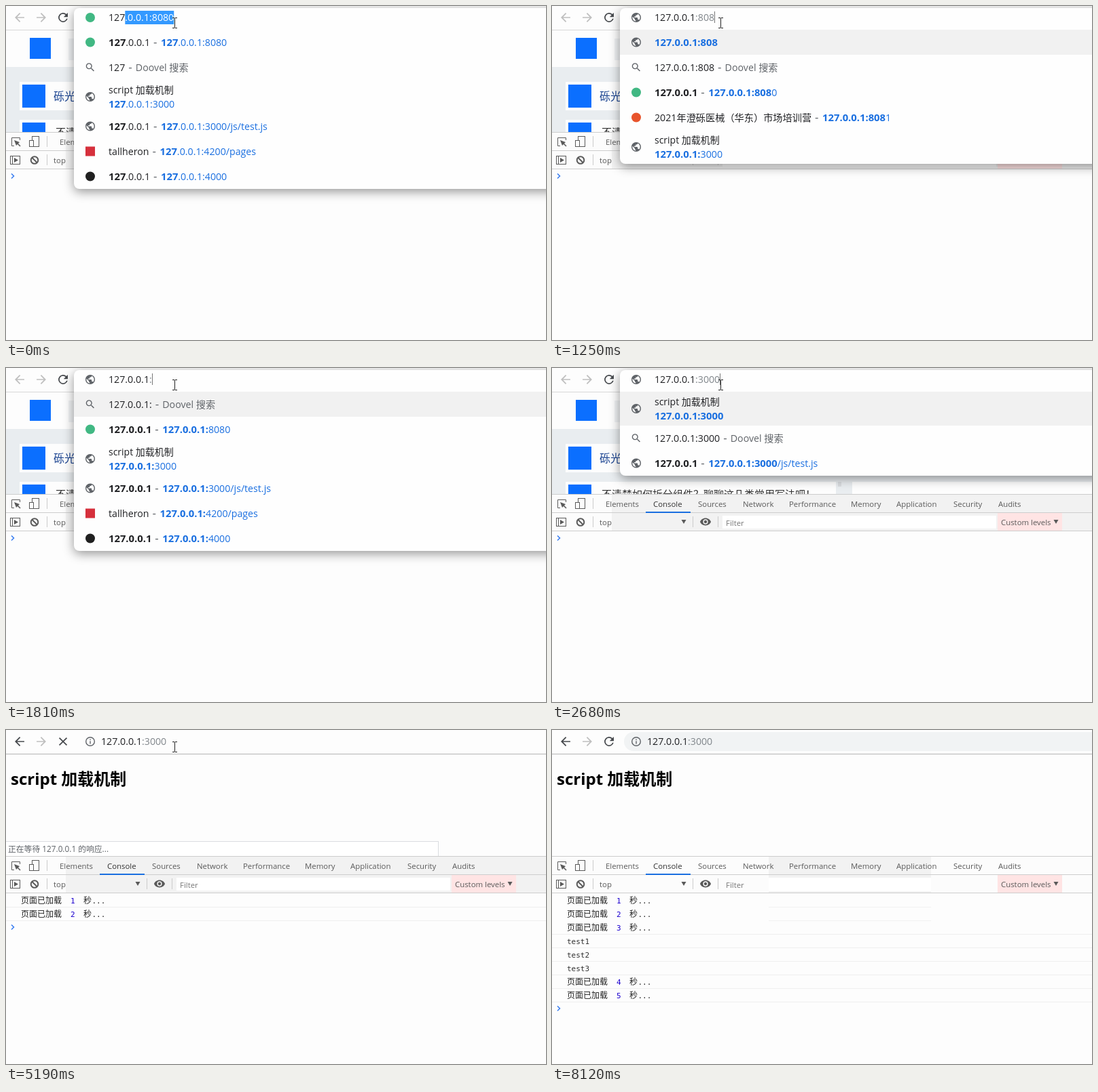
An HTML page with a canvas that plays this animation: 795x493 px, repeating every 8.22 s.

```html
<!DOCTYPE html>
<html lang="zh">
<head>
<meta charset="utf-8">
<style>
html, body { margin: 0; width: 100%; height: 100%; overflow: hidden; background: #fdfdfd; }
canvas { display: block; }
</style>
</head>
<body>
<canvas id="stage" width="795" height="493"></canvas>
<script>
const LOOP = 8220;
const c = document.getElementById('stage').getContext('2d');
const UI = '"Open Sans", "Noto Sans CJK SC", "Noto Sans CJK", sans-serif';
const MONO = '"DejaVu Sans Mono", "Noto Sans CJK SC", monospace';
const DARK = '#202124', GREY = '#5f6368', BLUE = '#1a6fe0';

const icons = {
  globe: 'M12 2C6.48 2 2 6.48 2 12s4.48 10 10 10 10-4.48 10-10S17.52 2 12 2zm-1 17.93c-3.95-.49-7-3.85-7-7.93 0-.62.08-1.21.21-1.79L9 15v1c0 1.1.9 2 2 2v1.93zm6.9-2.54c-.26-.81-1-1.39-1.9-1.39h-1v-3c0-.55-.45-1-1-1H8v-2h2c.55 0 1-.45 1-1V7h2c1.1 0 2-.9 2-2v-.41c2.93 1.19 5 4.06 5 7.41 0 2.08-.8 3.97-2.1 5.39z',
  search: 'M15.5 14h-.79l-.28-.27C15.41 12.59 16 11.11 16 9.5 16 5.91 13.09 3 9.5 3S3 5.91 3 9.5 5.91 16 9.5 16c1.61 0 3.09-.59 4.23-1.57l.27.28v.79l5 4.99L20.49 19zM9.5 14C7.01 14 5 11.99 5 9.5S7.01 5 9.5 5 14 7.01 14 9.5 11.99 14 9.5 14z',
  reload: 'M17.65 6.35A8 8 0 1 0 19.73 14h-2.08A6 6 0 1 1 16.22 7.78L13 11h7V4z',
  back: 'M20 11H7.83l5.59-5.59L12 4l-8 8 8 8 1.41-1.41L7.83 13H20z',
  forward: 'M4 11h12.17l-5.59-5.59L12 4l8 8-8 8-1.41-1.41L16.17 13H4z',
  stop: 'M19 6.41L17.59 5 12 10.59 6.41 5 5 6.41 10.59 12 5 17.59 6.41 19 12 13.41 17.59 19 19 17.59 13.41 12z',
  info: 'M11 17h2v-6h-2zM12 2a10 10 0 1 0 0 20 10 10 0 0 0 0-20zm0 18a8 8 0 1 1 0-16 8 8 0 0 1 0 16zM11 9h2V7h-2z',
  eye: 'M12 4.5C7 4.5 2.73 7.61 1 12c1.73 4.39 6 7.5 11 7.5s9.27-3.11 11-7.5C21.27 7.61 17 4.5 12 4.5zM12 17a5 5 0 1 1 0-10 5 5 0 0 1 0 10zm0-8a3 3 0 1 0 0 6 3 3 0 0 0 0-6z',
  arrow: 'M0 0V17L4 13 6.5 19 9 18 6.5 12H12z'
};
for (const name in icons) icons[name] = new Path2D(icons[name]);

const rows = {
  app: { dot: '#41b883', title: '127.0.0.1', url: '127.0.0.1:8080' },
  script: { title: 'script 加载机制', url: '127.0.0.1:3000', tall: true },
  test: { title: '127.0.0.1', url: '127.0.0.1:3000/js/test.js' },
  pages: { square: '#d6303c', title: 'tallheron', url: '127.0.0.1:4200/pages' },
  node: { dot: '#202020', title: '127.0.0.1', url: '127.0.0.1:4000' },
  camp: { dot: '#e8542c', title: '2021年澄砾医械（华东）市场培训营', url: '127.0.0.1:8081' },
  typed: {}, search: { icon: 'search' }
};

const HOST = '127.0.0.1';
const wide = 'typed search app camp script', ported = 'script search test';
const edits = [
  { at: 0, text: '127', rest: '.0.0.1:8080', list: 'app search script test pages node', plain: true },
  { at: 1000, text: HOST + ':8080', list: 'app search' },
  { at: 1250, text: HOST + ':808', list: wide },
  { at: 1380, text: HOST + ':80', list: wide },
  { at: 1530, text: HOST + ':8', list: 'typed search app camp' },
  { at: 1810, text: HOST + ':', list: 'search app script test pages node' },
  { at: 2090, text: HOST + ':3', rest: '000', list: ported },
  { at: 2370, text: HOST + ':30', rest: '00', list: ported },
  { at: 2520, text: HOST + ':300', rest: '0', list: ported },
  { at: 2680, text: HOST + ':3000', list: ported }
];
const logs = [[4190, 1], [5190, 2], [6160, 3], [6280, 'test1'], [6280, 'test2'], [6280, 'test3'], [7160, 4], [8120, 5]];
const moves = [[6740, 262, 47], [6860, 319, 121], [7010, 546, 405], [7160, 608, 467]];

function rect(x, y, w, h, color) {
  c.fillStyle = color;
  c.fillRect(x, y, w, h);
}

function text(x, y, str, color = DARK, size = 14.2, weight = 400, family = UI) {
  c.font = `${weight} ${size}px ${family}`;
  c.fillStyle = color;
  c.fillText(str, x, y);
  return x + c.measureText(str).width;
}

function icon(name, x, y, scale, color = GREY) {
  c.save();
  c.translate(x - 12 * scale, y - 12 * scale);
  c.scale(scale, scale);
  c.fillStyle = color;
  c.fill(icons[name], 'evenodd');
  c.restore();
}

function disc(x, y, r, color) {
  c.fillStyle = color;
  c.beginPath();
  c.arc(x, y, r, 0, 7);
  c.fill();
}

function triangle(x, y, w, h, color) {
  c.fillStyle = color;
  c.beginPath();
  c.moveTo(x - w / 2, y - h / 2);
  c.lineTo(x + w / 2, y - h / 2);
  c.lineTo(x, y + h / 2);
  c.fill();
}

function line(color, width, ...points) {
  c.strokeStyle = color;
  c.lineWidth = width;
  c.beginPath();
  for (let i = 0; i < points.length; i += 2) c.lineTo(points[i], points[i + 1]);
  c.stroke();
}

// Draws the part shared with the query in bold.
function matched(x, y, str, color, query) {
  let n = 0;
  while (n < str.length && str[n] === query[n]) n++;
  x = text(x, y, str.slice(0, n), color, 14.8, 700);
  return text(x, y, str.slice(n), color);
}

function feedPage() {
  rect(0, 36, 795, 150, '#e9edf0');
  rect(0, 36, 795, 54, '#fdfdfd');
  rect(35, 47, 31, 31, '#0b6fff');
  rect(92, 48, 200, 32, '#f0f2f4');
  for (const y of [112, 168]) {
    rect(20, y, 398, 42, '#fdfdfd');
    rect(442, y, 353, 42, '#fdfdfd');
    rect(24, y + 4, 34, 34, '#0b6fff');
  }
  rect(421, 168, 5, 7, '#d9dcdf');
  text(70, 139, '砾光', '#17408f', 16);
  text(127, 137, '前端', '#8a9099', 12);
  text(325, 138, '热门', '#8a9099', 15);
  text(371, 138, '最新', '#d0d3d6', 15);
  rect(446, 116, 34, 34, '#161414');
  text(492, 139, 'Codvax', '#111', 16.3);
  text(590, 137, '热门', '#8a9099', 12);
  text(696, 137, '今日', '#8a9099', 12);
  for (const x of [196, 563, 659, 765]) triangle(x, 133, 8, 4, '#c0c4cc');
  text(73, 192, '不清楚如何拆分组件？聊聊这几类常用写法吧！', '#333', 15);
}

function scriptPage(t) {
  rect(0, 36, 795, 150, '#fdfdfd');
  text(7, 81, 'script 加载机制', '#000', 24, 700);
  if (t < 3640 || t >= 6740) return;
  c.globalAlpha = t < 6590 ? 1 : 0.22;
  rect(0, 164, 637, 23, '#dadce0');
  rect(0, 165, 636, 21, '#fff');
  text(3, 180, '正在等待 127.0.0.1 的响应...', GREY, 11.8);
  c.globalAlpha = 1;
}

function devtools(t) {
  const pale = '#fcfcfc', bar = '#f2f2f2';
  const late = t >= 6160;
  rect(0, 186, 795, 307, '#fdfdfd');
  rect(0, 187, 795, 53, pale);
  if (!late) {
    rect(88, 187, 707, 53, bar);
    rect(251, 218, 403, 19, '#fff');
  }
  if (t >= 7010) {
    rect(319, 187, 239, 53, bar);
    rect(319, 218, 239, 20, '#fff');
    for (const y of [261, 281]) rect(319, y, 239, 1, '#f2f2f2');
  }
  for (const y of [186, 213, 240]) rect(0, y, 795, 1, '#cdcdcd');

  const ink = '#5a5a5a';
  line(ink, 1, 12, 206.5, 8.5, 206.5, 8.5, 194.5, 20.5, 194.5, 20.5, 198);
  line(ink, 1.6, 21, 207, 14, 200);
  c.fillStyle = ink;
  c.beginPath();
  c.moveTo(12, 198);
  c.lineTo(20, 201);
  c.lineTo(15, 206);
  c.fill();
  c.strokeStyle = ink;
  c.lineWidth = 1;
  c.strokeRect(38.5, 192.5, 10, 15);
  rect(34, 198, 7, 10, ink);
  rect(35, 199, 5, 8, pale);
  c.strokeRect(6.5, 221.5, 14, 12);
  rect(9, 222, 1, 11, ink);
  c.beginPath();
  c.moveTo(12, 224);
  c.lineTo(18, 227.5);
  c.lineTo(12, 231);
  c.fill();
  c.lineWidth = 2;
  c.beginPath();
  c.arc(42, 227.5, 5.3, 0, 7);
  c.stroke();
  line(ink, 2, 38.5, 224, 45.5, 231);
  for (const [x, y] of [[60, 192], [60, 219], [207, 219], [244, 219]]) rect(x, y, 1, 16, '#ccc');

  const tabs = { Elements: 79, Console: 149, Sources: 215, Network: 281, Performance: 349, Memory: 440, Application: 507, Security: 591, Audits: 657 };
  for (const name in tabs) text(tabs[name], 205, name, name === 'Console' ? '#333' : ink, 11.4);
  rect(138, 212, 66, 2, BLUE);
  text(70, 232, 'top', ink, 11.4);
  triangle(194, 227, 7, 6, ink);
  icon('eye', 226, 227, 0.73, ink);
  text(256, 233, 'Filter', '#777', 11.4);
  rect(656, 214, 95, 26, '#ffe4e4');
  text(661, 232, 'Custom levels', ink, 11.4);
  triangle(742, 227, 7, 6, ink);

  const shown = logs.filter(([at]) => t >= at);
  shown.forEach(([, value], i) => {
    const y = 256 + 20 * i;
    if (!late || i > 1) rect(0, y + 5, 795, 1, '#efefef');
    if (typeof value === 'string') return text(22, y, value, '#303030', 11, 400, MONO);
    text(22, y, '页面已加载', '#222', 12);
    text(95, y, value, '#1c00cf', 11, 400, MONO);
    text(114, y, '秒', '#222', 12);
    text(126.5, y, '...', '#222', 11, 400, MONO);
  });
  const y = 251 + 20 * shown.length;
  line('#367cf1', 1.5, 8, y - 3.5, 11.5, y, 8, y + 3.5);
}

function toolbar(t, loaded) {
  rect(0, 0, 795, 36, '#fdfdfd');
  rect(0, 35, 795, 1, loaded ? '#b4b4b4' : '#d8d8d8');
  icon('back', 20, 17, 0.87, loaded ? '#46494d' : '#bfbfbf');
  icon('forward', 52, 17, 0.87, '#bfbfbf');
  icon(loaded && t < 6280 ? 'stop' : 'reload', 84, 17, 0.87, '#46494d');
  if (!loaded) return;
  if (t >= 6740) {
    c.fillStyle = '#f1f3f4';
    c.beginPath();
    c.roundRect(106, 3, 720, 28, 14);
    c.fill();
  }
  icon('info', 124, 17, 0.7);
  text(text(140, 22, HOST), 22, ':3000', '#80868b');
}

function marker(row, x, y) {
  if (row.dot) disc(x, y, 7, row.dot);
  else if (row.square) rect(x - 7, y - 7, 14, 14, row.square);
  else icon(row.icon || 'globe', x, y, 0.7);
}

function dash(x, y) {
  text(x + 5, y, '-', GREY, 17);
  return x + 16;
}

function suggestions({ text: query, rest = '', list, plain }) {
  const items = list.split(' ').map(name => rows[name]);
  const height = row => row.tall ? 50 : 37;
  const bottom = items.reduce((sum, row) => sum + height(row), 35);
  c.save();
  c.shadowColor = 'rgba(0,0,0,.42)';
  c.shadowBlur = 16;
  c.shadowOffsetY = 4;
  c.fillStyle = '#fefefe';
  c.beginPath();
  c.roundRect(100, 3, 720, bottom - 3, 8);
  c.fill();
  c.restore();

  marker(items[0] === rows.app ? rows.app : {}, 124, 17);
  let x = text(151, 22, query.slice(0, 9));
  x = text(x, 22, query.slice(9), '#80868b');
  if (rest) {
    c.font = `400 14.2px ${UI}`;
    rect(x, 7, c.measureText(rest).width, 20, '#3399ff');
    text(x, 22, rest, '#fff');
  } else rect(Math.round(x), 8, 1, 17, '#777');

  if (!plain) rect(100, 35, 695, height(items[0]), '#f1f1f1');
  let top = 35;
  for (const row of items) {
    const y = top + 24;
    marker(row, 124, top + height(row) / 2);
    if (row === rows.typed) matched(151, y, query, BLUE, query);
    else if (row === rows.search) text(dash(text(151, y, query), y) - 0.5, y, 'Doovel 搜索', GREY);
    else if (row.tall) {
      text(151, top + 20, row.title, DARK, 14);
      matched(151, top + 41, row.url, BLUE, query);
    } else matched(dash(matched(151, y, row.title, DARK, query), y), y, row.url, BLUE, query);
    top += height(row);
  }
}

function pointer(t) {
  if (t < 6740) {
    line('#222', 1, 245, 17.5, 248, 17.5, 248.5, 18, 248.5, 32, 248, 32.5, 245, 32.5);
    line('#222', 1, 249, 17.5, 252, 17.5);
    line('#222', 1, 249, 32.5, 252, 32.5);
  } else if (t < 7310) {
    const [, x, y] = moves.findLast(([at]) => t >= at);
    c.save();
    c.translate(x, y);
    c.fillStyle = '#fff';
    c.fill(icons.arrow);
    c.strokeStyle = '#000';
    c.lineWidth = 1;
    c.stroke(icons.arrow);
    c.restore();
  }
}

function draw() {
  const t = performance.now() % LOOP;
  const loaded = t >= 3200;
  if (loaded) scriptPage(t); else feedPage();
  devtools(t);
  toolbar(t, loaded);
  if (!loaded) suggestions(edits.findLast(edit => t >= edit.at));
  pointer(t);
  requestAnimationFrame(draw);
}
draw();
</script>
</body>
</html>
```
